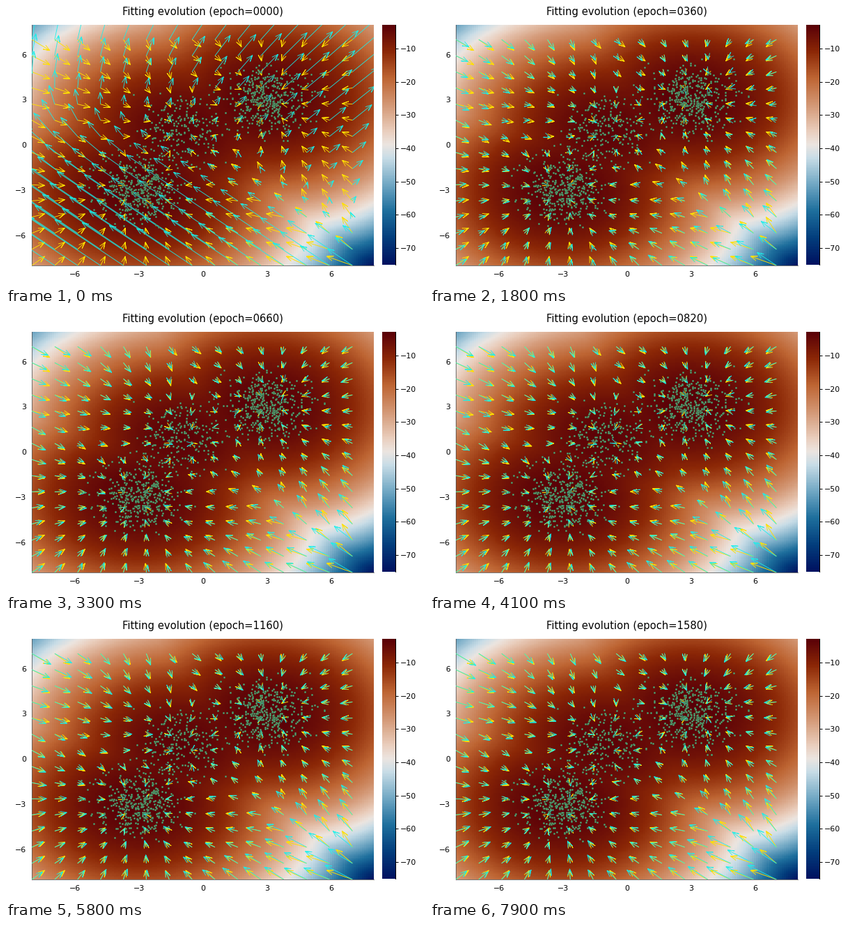
Write a matplotlib script that moves like this. It is 600x400 px and loops after 8 s.

```python
import numpy as np
import matplotlib.pyplot as plt
from matplotlib.animation import FuncAnimation
from matplotlib.collections import LineCollection
from matplotlib.colors import LinearSegmentedColormap

W, H, DPI = 600, 400, 100
FRAMES, INTERVAL, EPOCH_STEP = 80, 100, 20
PX = 72 / DPI                                  # points per pixel
LEFT, RIGHT, TOP, BOTTOM = 37, 528, 26.5, 372
UNIT = np.array([(RIGHT - LEFT) / 16, (BOTTOM - TOP) / 16])
ARROW_SCALE = 0.12

MEANS = np.array([[-3, -3], [3, 3], [-1, 1]], float)
WEIGHTS = np.array([0.4, 0.4, 0.2])

plt.rcParams["font.family"] = "DejaVu Sans"
cool = ["#001261", "#033e7d", "#1e6f9d", "#71a8c4", "#c9dde7"]
warm = ["#eacebd", "#d39774", "#be6533", "#8b2706", "#590008"]
stops = np.linspace(0, 1, 10)
vik = LinearSegmentedColormap.from_list("vik", [
    *zip(stops[:5], cool), (0.5, "#ece5e0"), *zip(stops[5:], warm)], N=256)


def log_terms(pts):
    d2 = ((pts[..., None, :] - MEANS) ** 2).sum(-1)
    return np.log(WEIGHTS) - d2 / 2 - np.log(2 * np.pi)


def log_density(pts):
    return np.logaddexp.reduce(log_terms(pts), axis=-1)


def score(pts, temp=1.0):
    """Gradient of the log density; temp > 1 blurs the component borders."""
    z = log_terms(pts) / temp
    resp = np.exp(z - np.logaddexp.reduce(z, axis=-1)[..., None])
    return resp @ MEANS - pts


def grid(axis):
    gx, gy = np.meshgrid(axis, axis)
    return np.stack([gx, gy], -1)


def softplus(v):
    return np.logaddexp(0, 1.5 * v) / 1.5


def untrained(pts):
    """Random network output before training, in pixels."""
    x, y = pts.T
    low = softplus(-0.65 * x - 1.1 * y - 0.3)
    high = softplus(0.9 * x + 0.9 * y - 1.5)
    up = softplus(0.8 * y - 0.5 * x - 1)
    return np.stack([-9 * low + 4.4 * high + 0.8 * up,
                     6 * low + 3.5 * high + 4 * up], -1)


def learned(pts, epoch):
    """Network output during training, in pixels."""
    x, y = pts.T
    drift = epoch / 600
    gain = 1.02 - 0.5 * np.exp(-epoch / 420)
    gain = gain + 0.25 * (1 - np.exp(-epoch / 300)) / (1 + np.exp(y - x + 8))
    ripple = np.stack([np.sin(0.8 * x + 0.6 * y + 1 + drift),
                       np.cos(0.9 * x - 0.7 * y - drift)], -1)
    amp = 0.75 + 0.35 * np.exp(-epoch / 700)
    temp = 1 - 0.08 * log_density(pts)[:, None]    # blurry far from the samples
    fit = (score(pts, temp) * gain[:, None] + amp * ripple) * ARROW_SCALE * UNIT
    start = np.exp(-(epoch / 75) ** 1.3)
    return start * untrained(pts) + (1 - start) * fit


def arrows(tails, vec, head=9.5, angle=np.radians(21)):
    """Open arrows: shaft and V head; vec is in pixels."""
    tip = tails + vec / UNIT
    back = -head * vec / np.maximum(np.hypot(*vec.T), 1e-6)[:, None]
    c, s = np.cos(angle), np.sin(angle)
    turn = np.array([[c, s], [-s, c]])
    a, b = tip + back @ turn / UNIT, tip + back @ turn.T / UNIT
    return np.stack([tails, tip, a, tip, b], 1)


fig = plt.figure(figsize=(W / DPI, H / DPI), dpi=DPI, facecolor="white")


def add_axes(x0, y0, x1, y1):
    return fig.add_axes([x0 / W, 1 - y1 / H, (x1 - x0) / W, (y1 - y0) / H])


def label(x, y, text, size=11, **kw):
    kw = {"ha": "center", "va": "center_baseline", "color": "black", **kw}
    return fig.text(x / W, 1 - y / H, text, fontsize=size * PX, **kw)


def minus(v):
    return str(v).replace("-", "\u2212")


# Density map
ax = add_axes(LEFT, TOP, RIGHT, BOTTOM)
density = log_density(grid(np.linspace(-8, 8, 161)))
lo, hi = density.min(), density.max()
ax.imshow(density, origin="lower", extent=(-8.05, 8.05, -8.05, 8.05), cmap=vik,
          vmin=lo, vmax=hi, aspect="auto", interpolation="nearest")
ax.set(xlim=(-8, 8), ylim=(-8, 8), xticks=[], yticks=[])
for side, spine in ax.spines.items():
    spine.set(visible=side in ("left", "bottom"), linewidth=0.8 * PX, color="#555555")
for v in (-6, -3, 0, 3, 6):
    label(282.8 + v * UNIT[0], 383.5, minus(v))
    label(29.5, 199.2 - v * UNIT[1], minus(v), ha="right")

# Colour bar
bar = add_axes(540, TOP, 558.5, 371)
bar.imshow(np.linspace(lo, hi, 256)[:, None], origin="lower", cmap=vik,
           extent=(0, 1, lo, hi), aspect="auto")
bar.set(xticks=[], yticks=range(-70, 0, 10), ylim=(lo, hi))
bar.tick_params(left=False, right=True, labelleft=False, length=4 * PX, width=PX)
for side, spine in bar.spines.items():
    spine.set(visible=side == "right", linewidth=PX)
for v in range(-70, 0, 10):
    label(566, TOP + (hi - v) / (hi - lo) * (371 - TOP), minus(v), ha="left")

# Samples
rng = np.random.default_rng(12)
samples = np.concatenate([m + np.clip(rng.normal(size=(int(1000 * w), 2)), -2.7, 2.7)
                          for m, w in zip(MEANS, WEIGHTS)])
ax.scatter(*samples.T, s=(2.7 * PX) ** 2, c="#60b07c", edgecolors="#2c4f38",
           linewidths=0.35 * PX, zorder=5)

# Vector fields
tails = grid(np.linspace(-8, 7, 15)).reshape(-1, 2)
true_field = arrows(tails, score(tails) * ARROW_SCALE * UNIT)
ax.add_collection(LineCollection(true_field, colors="#ffe000", linewidths=0.9 * PX,
                                 zorder=3), autolim=False)
model = LineCollection([], colors="#18f0ec", linewidths=0.9 * PX, alpha=0.9, zorder=4)
ax.add_collection(model, autolim=False)
title = label(282.5, 13, "", size=14.7, va="baseline")


def draw(i):
    epoch = i * EPOCH_STEP
    model.set_segments(arrows(tails, learned(tails, epoch)))
    title.set_text(f"Fitting evolution (epoch={epoch:04d})")
    return model, title


anim = FuncAnimation(fig, draw, frames=FRAMES, interval=INTERVAL, repeat=True,
                     repeat_delay=0, init_func=lambda: draw(0))
plt.show()
```
